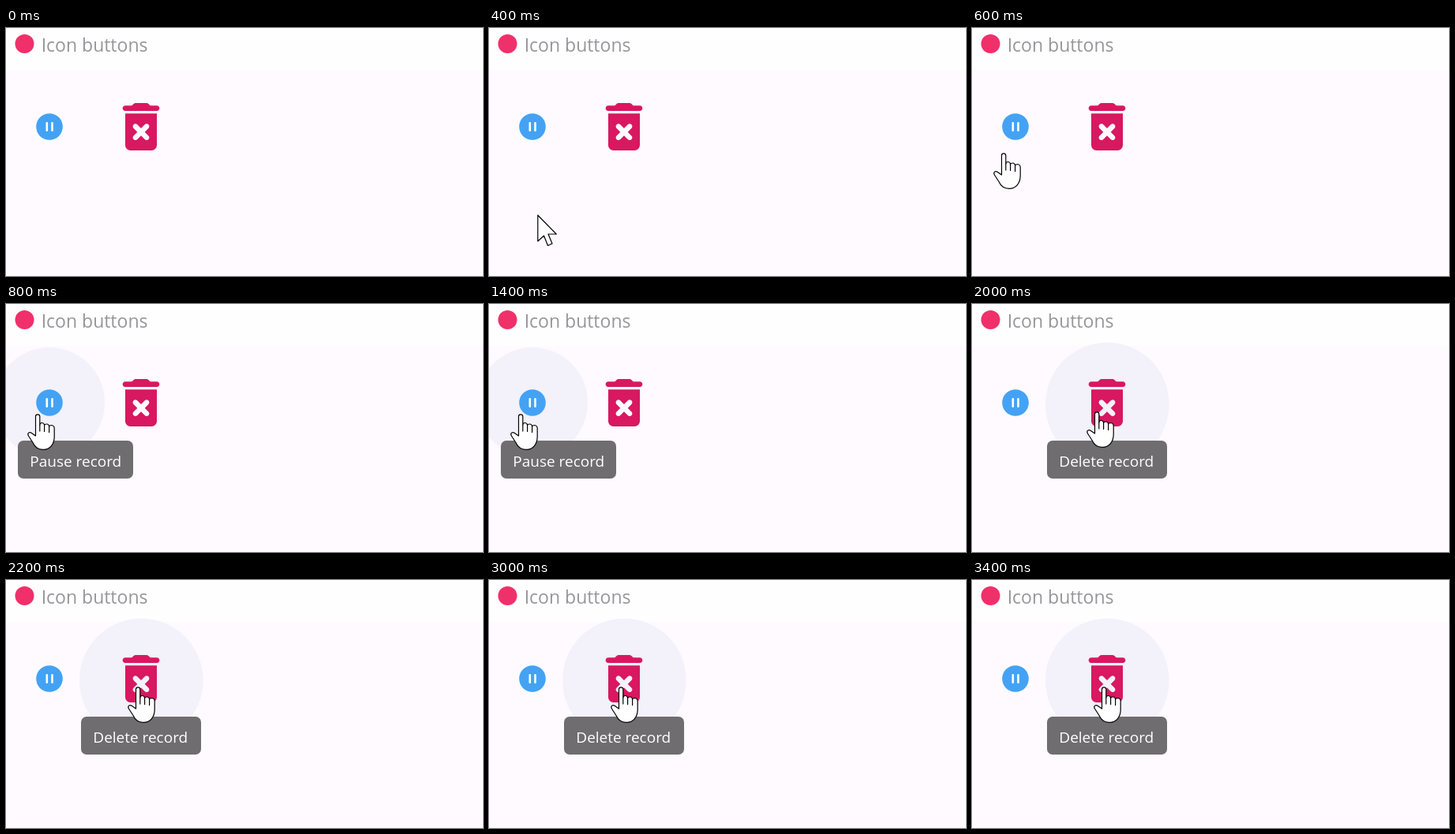
These frames come from a looping animation (604x314 px, 3.6 s). An HTML page:

```html
<!DOCTYPE html>
<html lang="en">
<head>
<meta charset="utf-8">
<title>Icon buttons</title>
<style>
  html, body { margin: 0; width: 100%; height: 100%; overflow: hidden; background: #fefaff; }
  svg { display: block; width: 604px; height: 314px; }
  text { font-family: "Open Sans", "Noto Sans", sans-serif; }
  .tooltip rect { fill: #6f6d70; }
  .tooltip text { fill: #fff; font-size: 19px; }
  .pointer { fill: #fff; stroke: #000; stroke-width: 1.2; stroke-linejoin: round; stroke-linecap: round; }
</style>
</head>
<body>
<svg viewBox="0 0 604 314">
  <rect width="604" height="314" fill="#fefaff"/>
  <rect width="604" height="53.5" fill="#fefefe"/>
  <circle cx="23.5" cy="20" r="12" fill="#f0306a"/>
  <text x="44.7" y="30" font-size="23" fill="#979599">Icon buttons</text>

  <circle id="pauseHover" cx="55" cy="125" r="70" fill="#f3f1fa"/>
  <circle id="deleteHover" cx="171.3" cy="127" r="78.3" fill="#f3f1fa"/>

  <circle cx="55" cy="125" r="16.8" fill="#44a2f4"/>
  <path d="M51.8 120.3V129.7M58.5 120.3V129.7" stroke="#fff" stroke-width="2.6" stroke-linecap="round"/>

  <path transform="translate(131 85) scale(3.333)" fill="#d81860" fill-rule="evenodd"
    d="M6 19c0 1.1.9 2 2 2h8c1.1 0 2-.9 2-2V7H6v12z
       m3.17-7.83c.39-.39 1.02-.39 1.41 0L12 12.59l1.42-1.42c.39-.39 1.02-.39 1.41 0
       .39.39.39 1.02 0 1.41L13.41 14l1.42 1.42c.39.39.39 1.02 0 1.41
       -.39.39-1.02.39-1.41 0L12 15.41l-1.42 1.42c-.39.39-1.02.39-1.41 0
       -.39-.39-.39-1.02 0-1.41L10.59 14l-1.42-1.42c-.39-.38-.39-1.02 0-1.41z
       M15.5 4l-.71-.71c-.18-.18-.44-.29-.7-.29H9.91c-.26 0-.52.11-.7.29L8.5 4H6
       c-.55 0-1 .45-1 1s.45 1 1 1h12c.55 0 1-.45 1-1s-.45-1-1-1h-2.5z"/>

  <g id="pauseTip" class="tooltip">
    <rect x="15" y="173" width="146" height="48" rx="7"/>
    <text x="30.3" y="206">Pause record</text>
  </g>
  <g id="deleteTip" class="tooltip">
    <rect x="95" y="173" width="152" height="48" rx="7"/>
    <text x="110.3" y="206">Delete record</text>
  </g>

  <path id="arrow" class="pointer"
    d="M.8 1V34L8.5 27L13.5 39.5L19 37L14 25H24.3Z"/>
  <g id="hand" class="pointer">
    <path d="M10.5 28V3.5Q10.5 .8 13.1 .8T15.8 3.5V14Q16 11.5 18.6 11.5T21.6 14.5
             Q22 13 24.6 13T27.6 16Q28 14.5 30.6 14.5Q34.2 15 34.2 18.5V29
             C34.2 38 29 45.3 20 45.3C12 45.3 9 41 7 36.5L1.5 28
             C-.5 24.5 2.5 22.5 5.2 24.2Z"/>
    <path fill="none" d="M15.8 14V22M21.6 14.5V22.5M27.6 16V23.5"/>
  </g>
</svg>
<script>
const LOOP = 3600;

// Each pose holds from its time until the next one.
const poses = [
  { at: 0 },
  { at: 200, arrow: [67, 279] },
  { at: 400, arrow: [61, 236] },
  { at: 600, hand: [27, 158] },
  { at: 800, hand: [27, 139], pauseHover: 1, pauseTip: 1 },
  { at: 1600, hand: [71, 137], pauseHover: 1, pauseTip: 1 },
  { at: 1800, hand: [111, 137], pauseHover: 0.35, pauseTip: 1 },
  { at: 2000, hand: [145, 136], deleteHover: 1, deleteTip: 1 },
  { at: 2200, hand: [154, 135], deleteHover: 1, deleteTip: 1 }
];

const element = id => document.getElementById(id);

function place(id, position) {
  element(id).style.display = position ? "" : "none";
  if (position) element(id).setAttribute("transform", `translate(${position})`);
}

function draw(time) {
  const pose = poses.filter(p => p.at <= time % LOOP).pop();
  for (const id of ["pauseHover", "pauseTip", "deleteHover", "deleteTip"])
    element(id).style.opacity = pose[id] || 0;
  place("arrow", pose.arrow);
  place("hand", pose.hand);
}

const start = performance.now();
function tick() {
  draw(performance.now() - start);
  requestAnimationFrame(tick);
}
tick();
</script>
</body>
</html>
```
